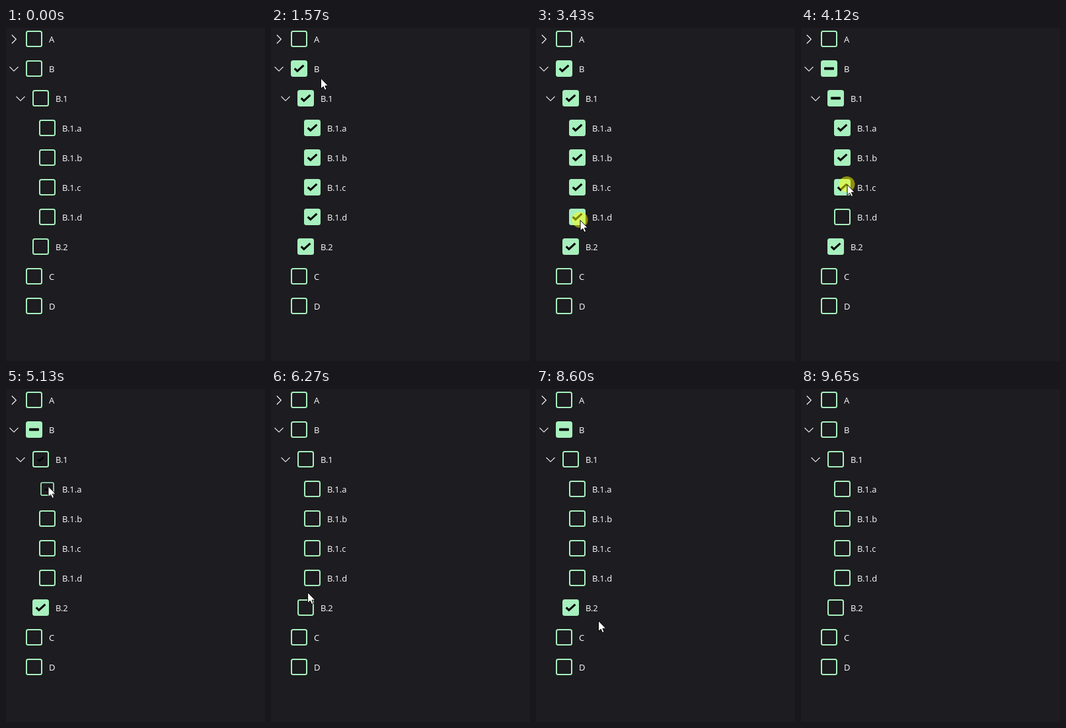
Write an HTML page with a canvas that moves like this. It is 392 by 505 pixels and loops after 9.98 s.

```html
<!DOCTYPE html>
<html lang="en">
<head>
<meta charset="utf-8">
<title>Checkbox tree</title>
<style>
  html, body { margin: 0; width: 100%; height: 100%; overflow: hidden; background: #1d1c20; }
  canvas { display: block; }
</style>
</head>
<body>
<canvas id="stage" width="392" height="505"></canvas>
<script>
const ctx = document.getElementById('stage').getContext('2d');
const LOOP = 9980, FADE = 150;
const BG = '#1d1c20', GREEN = '#a7f0be', LIGHT = '#fff', INK = '#000';

// Nesting depth follows from the dots in the label.
const rows = ['A', 'B', 'B.1', 'B.1.a', 'B.1.b', 'B.1.c', 'B.1.d', 'B.2', 'C', 'D'].map((label, i) => {
  const level = label.split('.').length - 1;
  return { label, x: 42.5 + level * 10, y: 16.5 + i * 45 };
});
const rowOf = label => rows.find(row => row.label === label);
const children = row => rows.filter(r => r.label.startsWith(row.label + '.'));
const leaves = row => {
  const below = children(row);
  return below.length ? below.filter(r => !children(r).length) : [row];
};

// aim: sideways offset from the box centre, pause: rest before the click
const click = (label, time, aim, pause) => ({ row: rowOf(label), time, aim, pause });
const clicks = [
  click('B', 1340, 10, 320),
  click('B.1.d', 3510, 4, 150),
  click('B.1.c', 4190, 7, 140),
  click('B.1.b', 4670, 5, 130),
  click('B.1.a', 5080, 1, 130),
  click('B.2', 6130, 3, 330),
  click('B', 7210, 9, 320),
  click('B.1', 7900, 5, 420),
  click('B.2', 8990, 7, 210)
];

// Clicking toggles every leaf below a row; parents derive their state from the leaves.
function stateOf(row, checked) {
  const own = leaves(row), count = own.filter(r => checked.has(r)).length;
  return count === 0 ? 'empty' : count === own.length ? 'check' : 'partial';
}
const checked = new Set();
rows.forEach(row => { row.history = [{ time: -FADE, state: 'empty' }]; });
for (const { row, time } of clicks) {
  const add = stateOf(row, checked) !== 'check';
  leaves(row).forEach(leaf => add ? checked.add(leaf) : checked.delete(leaf));
  for (const r of rows) {
    const state = stateOf(r, checked);
    if (state !== r.history.at(-1).state) r.history.push({ time, state });
  }
}

// The pointer rests at each click, slightly past the box in its direction of travel.
const key = (time, x, y) => ({ time, x, y });
const rests = clicks.flatMap(({ row, time, aim, pause }, i) => {
  const fromY = i ? clicks[i - 1].row.y : 384;
  const x = row.x + aim, y = row.y + 4.5 * Math.sign(row.y - fromY);
  return [key(time - pause, x, y), key(time - 10, x, y)];
});
const wander = [
  key(530, 295, 384), key(2200, 172, 156), key(2670, 77, 165.5), key(3200, 76, 307),
  key(5400, 63, 147), key(7240, 53, 95.5), key(8250, 209, 340), key(8600, 94, 351),
  key(9610, 362, 506)
];
const path = [...rests, ...wander].sort((a, b) => a.time - b.time);

const clamp = v => Math.max(0, Math.min(1, v));
const smooth = v => v * v * (3 - 2 * v);
const mix = (a, b, k) => a + (b - a) * k;

function pointerAt(t) {
  const i = path.findIndex(p => p.time > t);
  if (i < 1) return null;
  const a = path[i - 1], b = path[i];
  const k = smooth((t - a.time) / (b.time - a.time));
  return [mix(a.x, b.x, k), mix(a.y, b.y, k)];
}

function trace(points) {
  ctx.beginPath();
  points.forEach(([x, y]) => ctx.lineTo(x, y));
}

function stroke(color, width) {
  ctx.strokeStyle = color;
  ctx.lineWidth = width;
  ctx.stroke();
}

function fill(color) {
  ctx.fillStyle = color;
  ctx.fill();
}

function square(half, radius) {
  ctx.beginPath();
  ctx.roundRect(-half, -half, half * 2, half * 2, radius);
}

function drawIcon(kind, scale) {
  if (scale <= 0) return;
  ctx.scale(scale, scale);
  if (kind === 'partial') {
    ctx.beginPath();
    ctx.roundRect(-7.5, -2, 15, 4, 1);
    fill(INK);
  } else {
    trace([[-6.8, -0.1], [-2.7, 3.9], [6.9, -4.9]]);
    stroke(INK, 3.1);
  }
}

function drawChevron(row) {
  ctx.save();
  ctx.translate(row.x - 30.5, row.y + 0.5);
  if (row.label === 'A') ctx.rotate(-Math.PI / 2);
  trace([[-6.5, -3.2], [0, 3.3], [6.5, -3.2]]);
  stroke(LIGHT, 1.1);
  ctx.restore();
}

// The clicked box shrinks and springs back.
function pressScale(row, t) {
  const hit = clicks.find(c => c.row === row && t > c.time - 30 && t < c.time + FADE);
  return hit ? mix(0.83, 1, smooth(clamp((t - hit.time - 70) / 80))) : 1;
}

function drawBox(row, t) {
  const { time, state } = row.history.findLast(h => h.time <= t);
  const grown = clamp((t - time) / FADE);
  const scale = pressScale(row, t);
  ctx.save();
  ctx.translate(row.x, row.y);
  ctx.scale(scale, scale);
  if (state === 'empty') {
    square(11.5, 2.5);
    stroke(GREEN, 2);
    drawIcon('check', 1 - grown);
  } else {
    square(12.5, 3.5);
    fill(GREEN);
    drawIcon(state, grown);
  }
  ctx.restore();
}

function drawRow(row, t) {
  if (row.label === 'A' || children(row).length) drawChevron(row);
  drawBox(row, t);
  ctx.fillStyle = LIGHT;
  ctx.fillText(row.label, row.x + 22.5, row.y + 5.5);
}

function drawPointer(t) {
  const tip = pointerAt(t);
  if (!tip) return;
  ctx.save();
  ctx.translate(...tip);
  if (clicks.some(({ time }) => t > time - 140 && t < time - 20)) {
    ctx.beginPath();
    ctx.arc(0, 0, 12, 0, Math.PI * 2);
    fill('rgba(255, 255, 0, 0.5)');
  }
  trace([[0.5, 0.5], [0.5, 16.6], [4.2, 13.2], [6.6, 18.6], [9.2, 17.5], [6.9, 12.2], [11.8, 12.2]]);
  ctx.closePath();
  fill('#fff');
  stroke('#000', 1);
  ctx.restore();
}

function draw(t) {
  ctx.fillStyle = BG;
  ctx.fillRect(0, 0, 392, 505);
  ctx.font = '13px "Open Sans", "Noto Sans", sans-serif';
  rows.forEach(row => drawRow(row, t));
  drawPointer(t);
}

const start = performance.now();
function tick() {
  draw((performance.now() - start) % LOOP);
  requestAnimationFrame(tick);
}
tick();
</script>
</body>
</html>
```
